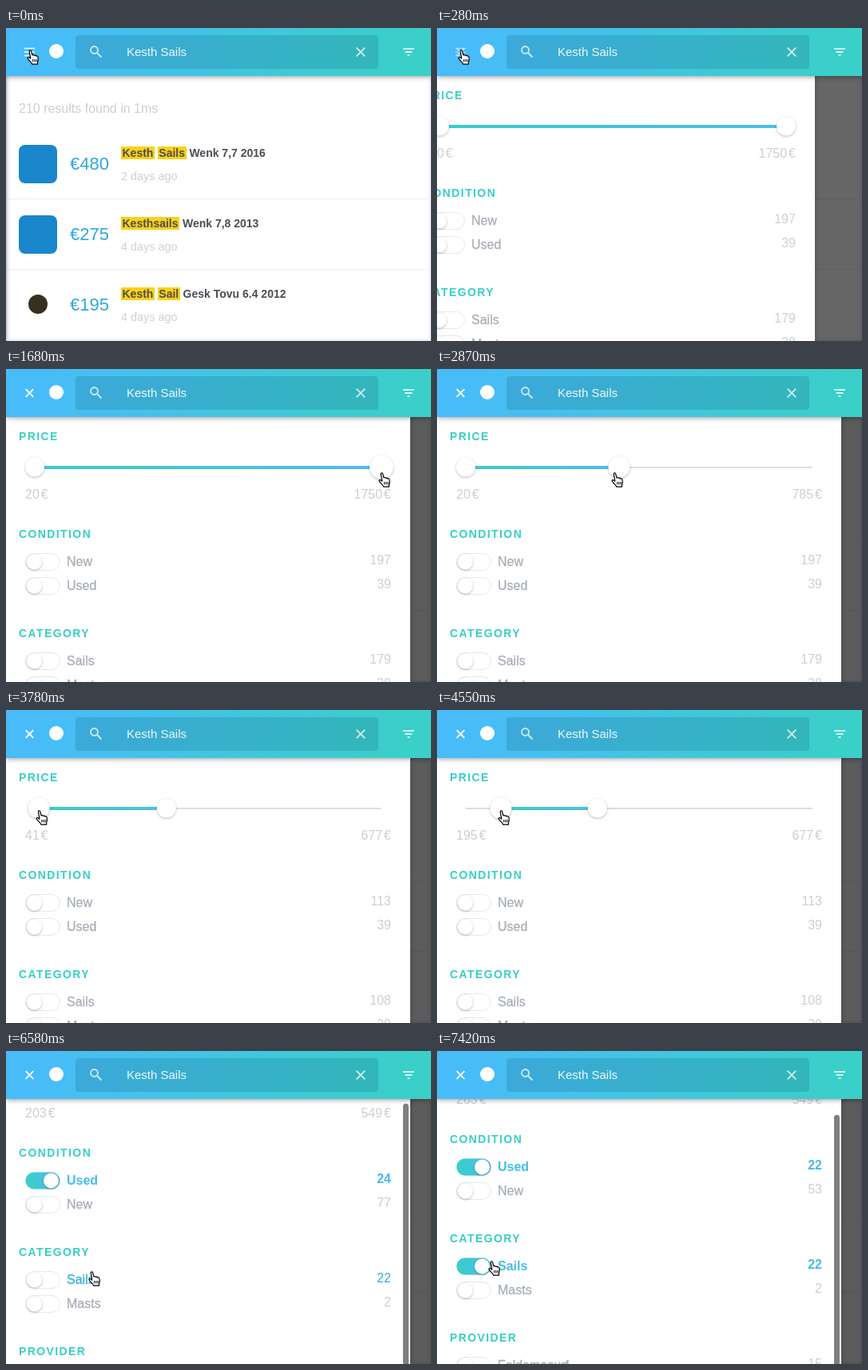
Animation of 532x391 px, one loop 7490 ms. Source, as an HTML page:

```html
<!DOCTYPE html>
<html lang="en">
<head>
<meta charset="utf-8">
<style>
html, body { margin: 0; width: 100%; height: 100%; overflow: hidden; background: #fff; }
body, text { font: 16px "Liberation Sans", Arial, sans-serif; }
#list, svg { position: absolute; left: 0; top: 0; width: 532px; height: 391px; overflow: hidden; }
#list { box-shadow: inset 0 0 5px rgba(70, 110, 200, .35); }
.found { position: absolute; left: 16px; top: 91px; line-height: 19px; color: #cbcfd5; white-space: nowrap; }
.hit { position: absolute; left: 0; width: 532px; height: 87px; border-bottom: 1px solid #eceef0; white-space: nowrap; }
.hit * { position: absolute; line-height: 17px; }
.hit i { left: 16px; top: 20px; width: 48px; height: 48px; border-radius: 8px; background: #1a86cb; }
.hit i.dot { left: 28px; top: 31px; width: 24px; height: 24px; border-radius: 50%; background: #35311f; }
.hit b { left: 144px; top: 22px; font-size: 14px; color: #4a4e54; }
.hit mark { position: static; padding: 0 1.5px; background: #fcd116; color: inherit; }
.hit span { left: 80px; top: 35px; font-size: 22px; color: #2fa9dc; }
.hit small { left: 144px; top: 51px; font-size: 14.4px; color: #ccd0d6; }
.head { font-weight: bold; font-size: 14px; letter-spacing: 1.4px; fill: #38cfc6; }
.num { fill: #cbcfd5; }
.name { fill: #a8aeb6; stroke: #a8aeb6; stroke-width: .3; }
.over { fill: #2fb0de; stroke: #2fb0de; }
.num.over { stroke: none; }
.on { fill: #45bde9; stroke: none; font-weight: bold; }
.end { text-anchor: end; }
.knob { fill: #fff; filter: drop-shadow(0 1px 1.5px rgba(0, 0, 0, .27)); }
.line { fill: none; stroke: #fff; }
</style>
</head>
<body>
<div id="list">
  <div class="found">210 results found in 1ms</div>
</div>
<svg viewBox="0 0 532 391">
  <defs>
    <linearGradient id="bar" gradientUnits="userSpaceOnUse" x1="60" y1="-20" x2="480" y2="110">
      <stop stop-color="#48bcf8"/><stop offset="1" stop-color="#3acfc8"/>
    </linearGradient>
    <linearGradient id="fill"><stop stop-color="#38cfc6"/><stop offset="1" stop-color="#4dbdee"/></linearGradient>
  </defs>
  <rect id="scrim" width="532" height="391"/>
  <g id="drawer">
    <rect width="506" height="391" fill="#fff" style="filter:drop-shadow(0 0 3px rgba(0,0,0,.3))"/>
    <g id="panel"></g>
    <rect id="thumb" x="497" width="7" height="500" rx="3.5" fill="#7d8083"/>
  </g>
  <rect width="532" height="60" fill="url(#bar)" style="filter:drop-shadow(0 1px 3px rgba(0,0,0,.4))"/>
  <rect x="87" y="9" width="379" height="42" rx="4" fill="#064060" opacity=".17"/>
  <path id="burger" class="line" stroke-width="1.4" d="M23 25.5h13M23 30h13M23 34.5h13"/>
  <path id="cross" class="line" stroke-width="1.9" d="M24.7 25.2l9.6 9.6m0-9.6l-9.6 9.6"/>
  <circle cx="63" cy="29" r="9" fill="#fff"/>
  <g class="line" opacity=".75" stroke-width="1.8">
    <circle cx="110.5" cy="27.5" r="4.5"/>
    <path d="M114 31l5.5 5.5M438.7 24.7l10.6 10.6m0-10.6l-10.6 10.6"/>
  </g>
  <path class="line" stroke-width="1.6" d="M497 26h14M499.5 30h9M502.5 34h3"/>
  <text x="151" y="35" fill="#fff" fill-opacity=".92" style="font-size:15px">Kesth Sails</text>
  <g id="hand">
    <path fill="#fff" stroke="#000" stroke-width="1.2" stroke-linejoin="round" d="M3.2 2.2C3 .6 5 .2 5.5 1.7L7 7C7.3 6.2 9.1 6.3 9.4 7.5C9.9 6.7 11.6 7 11.8 8.2C12.4 7.6 13.9 8 14 9.3C14.4 11.5 14.5 13 13.6 15L13.4 18.2H6.8C6 16 4 14.5 2.3 12.6C.6 10.9 .8 9.5 2.2 9.7C3 9.8 4 10.6 4.8 11.2Z"/>
    <path fill="none" stroke="#000" d="M7.7 12v3.4M9.8 12v3.4M11.9 12v3.4"/>
  </g>
</svg>
<script>
const LOOP = 7490, STEP = 70;
const $ = id => document.getElementById(id);
const clamp = v => Math.min(1, Math.max(0, v));
const mix = (a, b, p) => a + (b - a) * p;
const ramp = (t, from, to) => { const p = clamp((t - from) / (to - from)); return p * p * (3 - 2 * p); };

// Eased value of column c in a list of [time, value, ...] stops
function at(t, stops, c = 1) {
  let i = 0;
  while (i < stops.length - 2 && t >= stops[i + 1][0]) i++;
  const a = stops[i], b = stops[i + 1];
  return mix(a[c], b[c], ramp(t, a[0], b[0]));
}

const pointer = [
  [490, 26, 27], [770, 65, 105], [980, 395, 174], [1120, 398, 174], [1330, 479, 138],
  [1400, 479, 138], [1610, 466, 129], [1680, 466, 129], [2590, 236, 129], [2800, 236, 129],
  [2870, 218, 129], [2940, 195, 129], [3010, 81, 127], [3220, 81, 127], [3500, 32, 125],
  [3570, 32, 125], [4550, 76, 125], [4690, 78, 125], [4760, 78, 125], [5040, 30, 226],
  [5250, 44, 277], [5320, 44, 277], [5390, 44, 276], [5530, 44, 275], [5600, 44, 275],
  [5950, 103, 275], [6790, 103, 275], [7070, 64, 262]
];
const low = [[3570, 20], [4550, 195], [4690, 203]];
const high = [[1680, 1750], [2590, 840], [2800, 840], [2870, 785], [2940, 677]];
const lowSize = [[3430, 12], [3570, 13.5], [4690, 13.5], [4760, 12]];
const highSize = [[1540, 12], [1680, 15], [1820, 13.5], [2940, 13.5], [3010, 12]];
const scroll = [[6020, 0], [6300, 48], [6370, 48], [6720, 96]];
// time, New, Used, Sails, Masts
const counts = [
  [0, 197, 39, 179, 38], [3290, 113, 39, 108, 29], [4690, 77, 24, 88, 11],
  [5670, 77, 24, 22, 2], [7140, 53, 22, 22, 2]
];

const text = (x, y, cls, s) => `<text x="${x}" y="${y}" class="${cls}">${s}</text>`;
const euro = (x, cls, v) => text(x, 162, cls, `${Math.round(v)}<tspan dx="2">€</tspan>`);
const knob = (x, y, r) => `<circle class="knob" cx="${x}" cy="${y}" r="${r}"/>`;

function row(y, name, count, on, tipY) {
  const cls = on > 0 ? 'on' : Math.abs(tipY - y) < 14 ? 'over' : '';
  return `<rect x="24.5" y="${y - 10.5}" width="43" height="21" rx="10.5" fill="#fff" stroke="#e6e8eb"/>
    <rect x="24.5" y="${y - 10.5}" width="43" height="21" rx="10.5" fill="url(#fill)" opacity="${on}"/>`
    + knob(mix(35.5, 56.5, on), y, 9.5)
    + text(76, y + 5, 'name ' + cls, name) + text(482, y + 3, 'num end ' + cls, count);
}

function panel(t, tipY) {
  const lo = at(t, low), hi = t < 5670 ? at(t, high) : 549;
  const place = (v, max) => 36 + 434 * (v - 20) / (max - 20);
  const zoom = ramp(t, 5600, 5950);
  const x1 = mix(place(lo, 1750), place(203, 549), zoom);
  const x2 = mix(place(at(t, high), 1750), 470, zoom);
  const [, fresh, used, sails, masts] = counts.filter(c => c[0] <= t).pop();
  const usedOn = ramp(t, 5600, 5810), sailsOn = ramp(t, 7070, 7280);
  const swap = t >= 5670;
  return text(16, 89, 'head', 'PRICE')
    + `<rect x="36" y="122" width="434" height="2" fill="#dcdee1"/>
       <rect x="${x1}" y="121" width="${x2 - x1}" height="4" fill="url(#fill)"/>`
    + knob(x1, 122.5, at(t, lowSize)) + knob(x2, 122.5, at(t, highSize))
    + euro(24, 'num', lo) + euro(482, 'num end', hi)
    + text(16, 211, 'head', 'CONDITION')
    + row(swap ? 271 : 241, 'New', fresh, 0, tipY)
    + row(swap ? 241 : 271, 'Used', used, usedOn, tipY)
    + text(16, 335, 'head', 'CATEGORY')
    + row(365, 'Sails', sails, sailsOn, tipY) + row(395, 'Masts', masts, 0, tipY)
    + text(16, 459, 'head', 'PROVIDER') + row(489, 'Feldamosurf', 15, 0, tipY);
}

function draw(t) {
  const open = 1 - (1 - clamp((t - 35) / 410)) ** 3;
  const x = at(t, pointer), y = at(t, pointer, 2), top = at(t, scroll);
  const move = (id, dx, dy) => $(id).setAttribute('transform', `translate(${dx} ${dy})`);
  $('scrim').setAttribute('opacity', .64 * open);
  move('drawer', -506 * (1 - open), 0);
  move('panel', 0, -top);
  $('panel').innerHTML = panel(t, y + 1 + top);
  $('thumb').setAttribute('y', top * .83);
  $('thumb').setAttribute('opacity', ramp(t, 6020, 6160));
  const turn = ramp(t, 70, 450);
  $('burger').setAttribute('opacity', 1 - turn);
  $('cross').setAttribute('opacity', turn);
  move('hand', x, y);
}

const hits = [
  ['€480', '<mark>Kesth</mark> <mark>Sails</mark> Wenk 7,7 2016', 2, ''],
  ['€275', '<mark>Kesthsails</mark> Wenk 7,8 2013', 4, ''],
  ['€195', '<mark>Kesth</mark> <mark>Sail</mark> Gesk Tovu 6.4 2012', 4, 'dot']
];
$('list').innerHTML += hits.map(([price, title, days, logo], i) =>
  `<div class="hit" style="top:${126 + 88 * i}px"><i class="${logo}"></i><span>${price}</span>
   <b>${title}</b><small>${days} days ago</small></div>`).join('');

let last = -1;
function tick() {
  const t = Math.floor(performance.now() % LOOP / STEP) * STEP;
  if (t !== last) draw(last = t);
  requestAnimationFrame(tick);
}
tick();
</script>
</body>
</html>
```
